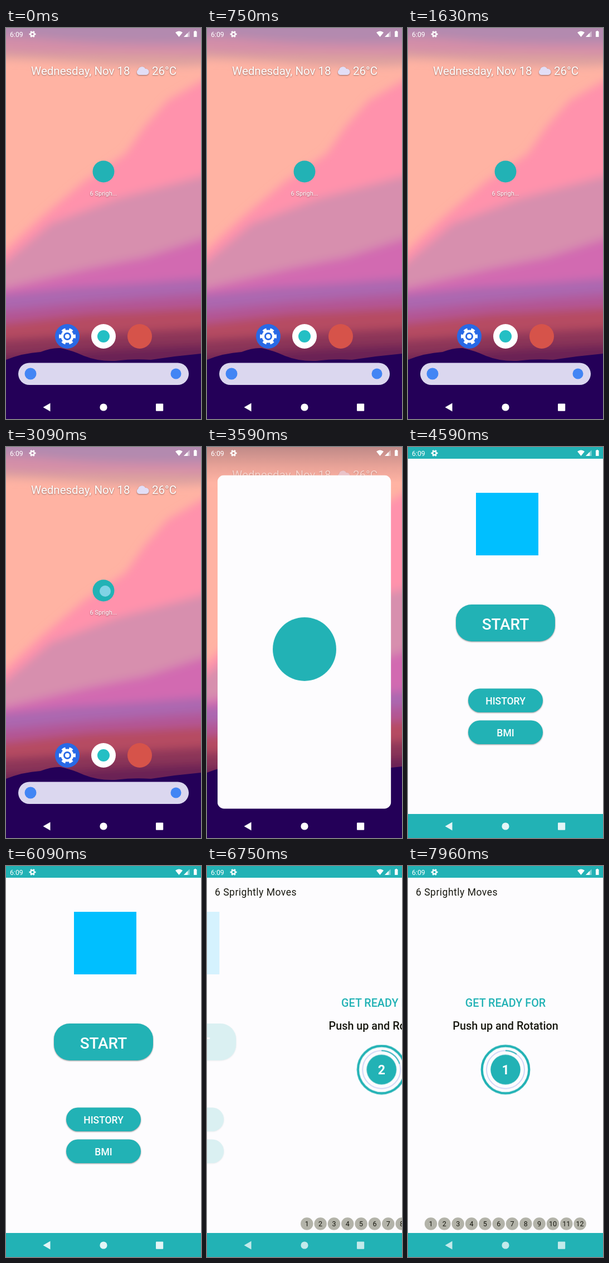
Write an HTML page that moves like this. It is 350x700 px and loops after 8000 ms.

```html
<!DOCTYPE html>
<html lang="en">
<head>
<meta charset="utf-8">
<title>Workout app launch</title>
<style>
  :root { --teal: #22b2b5; --paper: #fdfcfe; }
  html, body { margin: 0; width: 100%; height: 100%; overflow: hidden; background: #240058; }
  body { position: relative; font-family: Roboto, sans-serif; }
  body > svg, .splash { position: absolute; inset: 0; width: 100%; height: 100%; display: block; }
  text { font-family: Roboto, sans-serif; }
  .mid { text-anchor: middle; }
  .medium { font-weight: 500; }
  .teal { fill: var(--teal); }
  .shade { filter: drop-shadow(0 1px 1px #0006); }

  .sky, .haze, .launcher, .touch, .splash, .disc, .app, .bars, .nav, .leave, .enter, .title, .two, .one {
    animation: 8s linear infinite both;
  }

  /* Home screen */
  .sky { animation-name: sky; }
  @keyframes sky { 0%, 43% { transform: none } 44.875%, 100% { transform: translateY(-11px) } }
  .haze { animation-name: haze; }
  @keyframes haze { 0%, 43% { opacity: 0 } 44.6%, 100% { opacity: 1 } }
  .launcher { animation-name: launcher; }
  @keyframes launcher {
    0%, 43% { transform: none; opacity: 1 }
    44.875% { transform: translateY(-27px); opacity: .5 }
    46.75%, 100% { transform: translateY(-34px); opacity: 0 }
  }
  .touch { animation-name: touch; }
  @keyframes touch { 0%, 37.8% { opacity: 0 } 38.3%, 39.4% { opacity: .8 } 40%, 100% { opacity: 0 } }

  /* Window growing out of the icon */
  .splash { background: var(--paper); animation-name: grow; }
  @keyframes grow {
    0%, 43% {
      opacity: 0; clip-path: inset(237px 155px 423px 155px round 20px);
      animation-timing-function: cubic-bezier(.25, .4, .6, .9);
    }
    43.5% { opacity: 1 }
    44.875% {
      clip-path: inset(51px 20px 53px 19px round 12px);
      animation-timing-function: cubic-bezier(.3, .5, .6, 1);
    }
    46.75%, 100% { opacity: 1; clip-path: inset(0 0 0 0 round 0px) }
  }
  .disc {
    position: absolute; left: 111px; top: 286px; width: 128px; height: 128px;
    border-radius: 50%; background: var(--teal); animation-name: disc;
  }
  @keyframes disc {
    0%, 43% { transform: translateY(-73px) scale(.114); animation-timing-function: cubic-bezier(.25, .4, .6, .9) }
    44.875% { transform: translateY(12px) scale(.889); animation-timing-function: cubic-bezier(.3, .5, .6, 1) }
    46.75%, 100% { transform: none }
  }

  /* App screens */
  .app, .bars { animation-name: appear; }
  @keyframes appear { 0%, 52.5% { opacity: 0 } 54%, 100% { opacity: 1 } }
  .nav { animation-name: dim; }
  @keyframes dim { 0%, 52.5% { opacity: 1 } 54%, 81% { opacity: .88 } 83%, 100% { opacity: .73 } }
  .leave { animation-name: leave; }
  @keyframes leave {
    0%, 81% { transform: none; opacity: 1 }
    84.375% { transform: translateX(-211px); opacity: .16; animation-timing-function: cubic-bezier(.33, .5, .67, 1) }
    88%, 100% { transform: translateX(-350px); opacity: 0 }
  }
  .enter { animation-name: enter; }
  @keyframes enter {
    0%, 81% { transform: translateX(350px) }
    84.375% { transform: translateX(139px); animation-timing-function: cubic-bezier(.33, .5, .67, 1) }
    88%, 100% { transform: none }
  }
  .title { animation-name: title; }
  @keyframes title { 0%, 81% { opacity: 0 } 83.5%, 100% { opacity: 1 } }
  .two, .one { animation-timing-function: step-end; }
  .two { animation-name: two; }
  .one { animation-name: one; }
  @keyframes two { 0% { opacity: 1 } 93.6%, 100% { opacity: 0 } }
  @keyframes one { 0% { opacity: 0 } 93.6%, 100% { opacity: 1 } }
</style>
</head>
<body>

<svg viewBox="0 0 350 700">
  <defs>
    <filter id="soft" x="-10%" y="-10%" width="120%" height="120%"><feGaussianBlur stdDeviation="8"/></filter>
    <linearGradient id="dusk" x2="0" y2="1">
      <stop offset="0" stop-color="#c08a88"/>
      <stop offset=".45" stop-color="#e9a398"/>
      <stop offset=".8" stop-color="#ffb3a3"/>
      <stop offset="1" stop-color="#ffb3a3" stop-opacity="0"/>
    </linearGradient>
  </defs>
  <g class="sky">
    <rect y="-20" width="350" height="740" fill="#ffb3a3"/>
    <g filter="url(#soft)">
      <path fill="#dca09f" d="M-30-30H380V66Q250 72 150 64T-30 54Z"/>
      <path fill="#d48ea8" d="M-30-30H380V50Q240 46 150 46T-30 40Z"/>
      <path fill="#b38aaf" d="M-30-30H380V28Q200 30 100 22T-30 16Z"/>
      <path fill="#ff92ac" d="M-30 425 0 397 60 342 140 275 215 225 250 175 290 130 380 78V720H-30Z"/>
      <path fill="#d78fae" d="M-30 445 0 418 80 350 200 305 380 258V720H-30Z"/>
      <path fill="#d26ab1" d="M-30 472 150 430 250 410 380 368V720H-30Z"/>
      <path fill="#ab68b0" d="M-30 480 120 464 250 456 380 446V720H-30Z"/>
      <path fill="#b35695" d="M-30 508 150 490 380 474V720H-30Z"/>
      <path fill="#b64c62" d="M-30 532 150 512 380 500V720H-30Z"/>
      <path fill="#8c3459" d="M-30 560 150 548 380 536V720H-30Z"/>
      <path fill="#6a2455" d="M-30 588 200 574 380 566V720H-30Z"/>
    </g>
    <path fill="#240058" d="M0 594Q30 582 62 580Q82 572 98 573Q118 577 140 587Q165 597 195 596Q225 592 260 594Q305 587 350 583V720H0Z"/>
  </g>
  <rect class="haze" width="350" height="80" fill="url(#dusk)"/>

  <g class="launcher">
    <g class="shade" fill="#fff" font-size="20.5">
      <text x="45" y="84">Wednesday, Nov 18</text>
      <text x="262" y="84">26°C</text>
      <path fill="#e2def6" d="M239 84a5 5 0 0 1-2-9 7 7 0 0 1 13-2 5.5 5.5 0 0 1 2 11Z"/>
    </g>
    <circle class="teal" cx="175" cy="257" r="19.5"/>
    <text class="mid shade" x="175" y="299.5" font-size="11" fill="#fff">6 Sprigh...</text>
    <g transform="translate(110 552)">
      <circle r="22" fill="#2869e6"/>
      <circle r="12.5" fill="none" stroke="#fff" stroke-width="5" pathLength="12" stroke-dasharray="1 1" stroke-dashoffset=".5"/>
      <circle r="11.5" fill="#fff"/>
      <circle r="5.5" fill="#fff" stroke="#2869e6" stroke-width="3"/>
    </g>
    <circle cx="175" cy="552" r="22" fill="#fff"/>
    <circle cx="175" cy="552" r="11" fill="#24bfc4"/>
    <circle cx="240" cy="552" r="22" fill="#d6534a"/>
    <rect x="22" y="599.5" width="306" height="39.5" rx="19.75" fill="#dbd7ef"/>
    <circle cx="44" cy="619" r="10.5" fill="#4285f4"/>
    <circle cx="305" cy="619" r="9.5" fill="#4285f4"/>
  </g>
  <circle class="touch" cx="178" cy="258" r="10" fill="#98dcf2"/>
</svg>

<div class="splash"><div class="disc"></div></div>

<svg class="app" viewBox="0 0 350 700">
  <rect width="350" height="700" fill="#fdfcfe"/>
  <g class="leave">
    <rect x="122" y="82" width="112" height="112" fill="#00bfff"/>
    <g class="teal shade">
      <rect x="86" y="282" width="178" height="66" rx="28"/>
      <rect x="108" y="432.5" width="134" height="42.5" rx="21"/>
      <rect x="108" y="489.5" width="134" height="42.5" rx="21"/>
    </g>
    <g class="mid medium" fill="#fff">
      <text x="175" y="327" font-size="28">START</text>
      <text x="175" y="461" font-size="17.5">HISTORY</text>
      <text x="175" y="518" font-size="17.5">BMI</text>
    </g>
  </g>
  <text class="title" x="14" y="53" font-size="17.5" letter-spacing=".5" fill="#17170f">6 Sprightly Moves</text>
  <g class="enter">
    <g class="mid medium" font-size="19.8">
      <text class="teal" x="175" y="252">GET READY FOR</text>
      <text x="175" y="293" fill="#17170f">Push up and Rotation</text>
    </g>
    <g transform="translate(175 364.5)" fill="none" stroke="#22b2b5">
      <circle r="42.3" stroke-width="4.2"/>
      <circle r="34" stroke="#c6cdf4" stroke-width="1.6"/>
      <g transform="rotate(-90)" stroke-width="1.8">
        <circle class="two" r="34" pathLength="10" stroke-dasharray="2 10"/>
        <circle class="one" r="34" pathLength="10" stroke-dasharray="1 10"/>
      </g>
      <circle class="teal" r="26.8" stroke="none"/>
      <g class="mid" font-size="23" font-weight="700" fill="#fff" stroke="none">
        <text class="two" y="8.5">2</text>
        <text class="one" y="8.5">1</text>
      </g>
    </g>
    <g id="steps" class="mid" font-size="12.5"></g>
  </g>
</svg>

<svg viewBox="0 0 350 700">
  <g class="bars teal">
    <rect width="350" height="21"/>
    <rect y="657" width="350" height="43"/>
  </g>
  <g fill="#fff">
    <text x="7" y="15.5" font-size="12.3">6:09</text>
    <g transform="translate(47.5 11)" fill="none" stroke="#fff">
      <circle r="3.3" stroke-width="2.4"/>
      <circle r="5" stroke-width="2" pathLength="12" stroke-dasharray="1 1" stroke-dashoffset=".5"/>
    </g>
    <path d="M304 8Q310.5 3 317 8L310.5 16Z"/>
    <path d="M319 16 329.5 5.5V16Z" fill-opacity=".45"/>
    <path d="M319 16 326 9V16Z"/>
    <path d="M337 6H338.5V5H341V6H342.5V16H337Z"/>
  </g>
  <g class="nav" fill="#fff">
    <path d="M66.5 679 79.5 671.5V686.5Z"/>
    <circle cx="175" cy="679" r="6.6"/>
    <rect x="269" y="672.5" width="13.2" height="13.2" rx="1"/>
  </g>
</svg>

<script>
  // Row of exercise steps
  document.getElementById('steps').innerHTML = Array.from({ length: 12 }, (_, i) => {
    const x = 41 + i * 24.33;
    return `<circle cx="${x}" cy="640.5" r="11.2" fill="#b3b3a9"/>` +
           `<text x="${x}" y="645" fill="#17170f">${i + 1}</text>`;
  }).join('');
</script>
</body>
</html>
```
